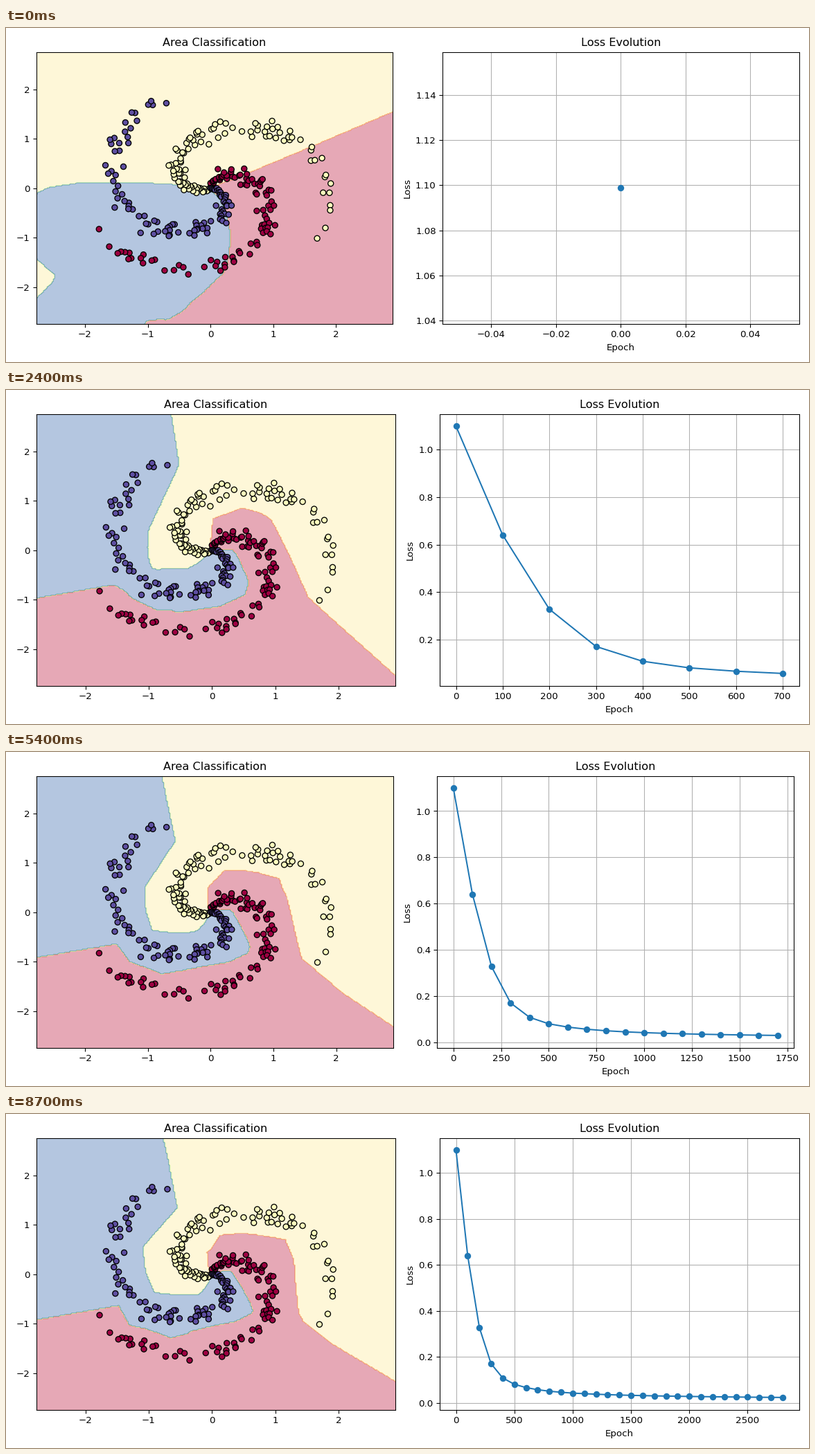
These frames come from a looping animation (1159 by 483 pixels, 9 s). A matplotlib script:

```python
import numpy as np
import matplotlib.pyplot as plt
from matplotlib.animation import FuncAnimation

WIDTH, HEIGHT, DPI = 1159, 483, 96.6
FRAMES, INTERVAL = 30, 300
CLASSES, PER_CLASS, HIDDEN = 3, 100, 100
LEARNING_RATE = 1.0
EPOCHS_PER_FRAME = 100
GRID_STEP = 0.02


def make_spirals():
    arms = []
    for k in range(CLASSES):
        r = np.linspace(0, 2, PER_CLASS)
        t = np.linspace(4 * k, 4 * (k + 1), PER_CLASS)
        t += 0.2 * np.random.randn(PER_CLASS)
        arms.append(np.c_[r * np.sin(t), r * np.cos(t)])
    return np.vstack(arms), np.repeat(np.arange(CLASSES), PER_CLASS)


def forward(x, w1, b1, w2, b2):
    hidden = np.maximum(0, x @ w1 + b1)
    return hidden, hidden @ w2 + b2


def train(x, labels):
    """Full-batch gradient descent; returns the losses and weights to show."""
    w1 = 0.01 * np.random.randn(2, HIDDEN)
    b1 = np.zeros(HIDDEN)
    w2 = 0.01 * np.random.randn(HIDDEN, CLASSES)
    b2 = np.zeros(CLASSES)
    params = [w1, b1, w2, b2]
    one_hot = np.eye(CLASSES)[labels]
    losses, snapshots = [], []
    for epoch in range((FRAMES - 2) * EPOCHS_PER_FRAME + 1):
        hidden, scores = forward(x, *params)
        probs = np.exp(scores - scores.max(axis=1, keepdims=True))
        probs /= probs.sum(axis=1, keepdims=True)

        d_scores = (probs - one_hot) / len(x)
        d_hidden = (d_scores @ w2.T) * (hidden > 0)
        grads = [x.T @ d_hidden, d_hidden.sum(axis=0),
                 hidden.T @ d_scores, d_scores.sum(axis=0)]
        for param, grad in zip(params, grads):
            param -= LEARNING_RATE * grad

        if epoch % EPOCHS_PER_FRAME == 0:
            losses.append(-np.log((probs * one_hot).sum(axis=1)).mean())
            snapshots.append([param.copy() for param in params])
    return losses, snapshots


np.random.seed(0)
points, labels = make_spirals()
losses, snapshots = train(points, labels)
epochs = EPOCHS_PER_FRAME * np.arange(len(losses))

(x_min, y_min), (x_max, y_max) = points.min(axis=0) - 1, points.max(axis=0) + 1
xx, yy = np.meshgrid(np.arange(x_min, x_max, GRID_STEP),
                     np.arange(y_min, y_max, GRID_STEP))
grid = np.c_[xx.ravel(), yy.ravel()]

# The small excess keeps the pixel size from being rounded down.
fig, (ax_area, ax_loss) = plt.subplots(
    1, 2, figsize=((WIDTH + 0.01) / DPI, (HEIGHT + 0.01) / DPI), dpi=DPI)


def update(frame):
    shown = max(1, frame)
    _, scores = forward(grid, *snapshots[shown - 1])
    areas = scores.argmax(axis=1).reshape(xx.shape)

    ax_area.clear()
    ax_area.contourf(xx, yy, areas, cmap="Spectral", alpha=0.4)
    ax_area.scatter(*points.T, c=labels, cmap="Spectral", edgecolors="k")
    ax_area.set_title("Area Classification")

    ax_loss.clear()
    ax_loss.plot(epochs[:shown], losses[:shown], marker="o")
    ax_loss.set(title="Loss Evolution", xlabel="Epoch", ylabel="Loss")
    ax_loss.grid(True)
    fig.tight_layout()


anim = FuncAnimation(fig, update, frames=FRAMES, interval=INTERVAL, repeat=True)
plt.show()
```
